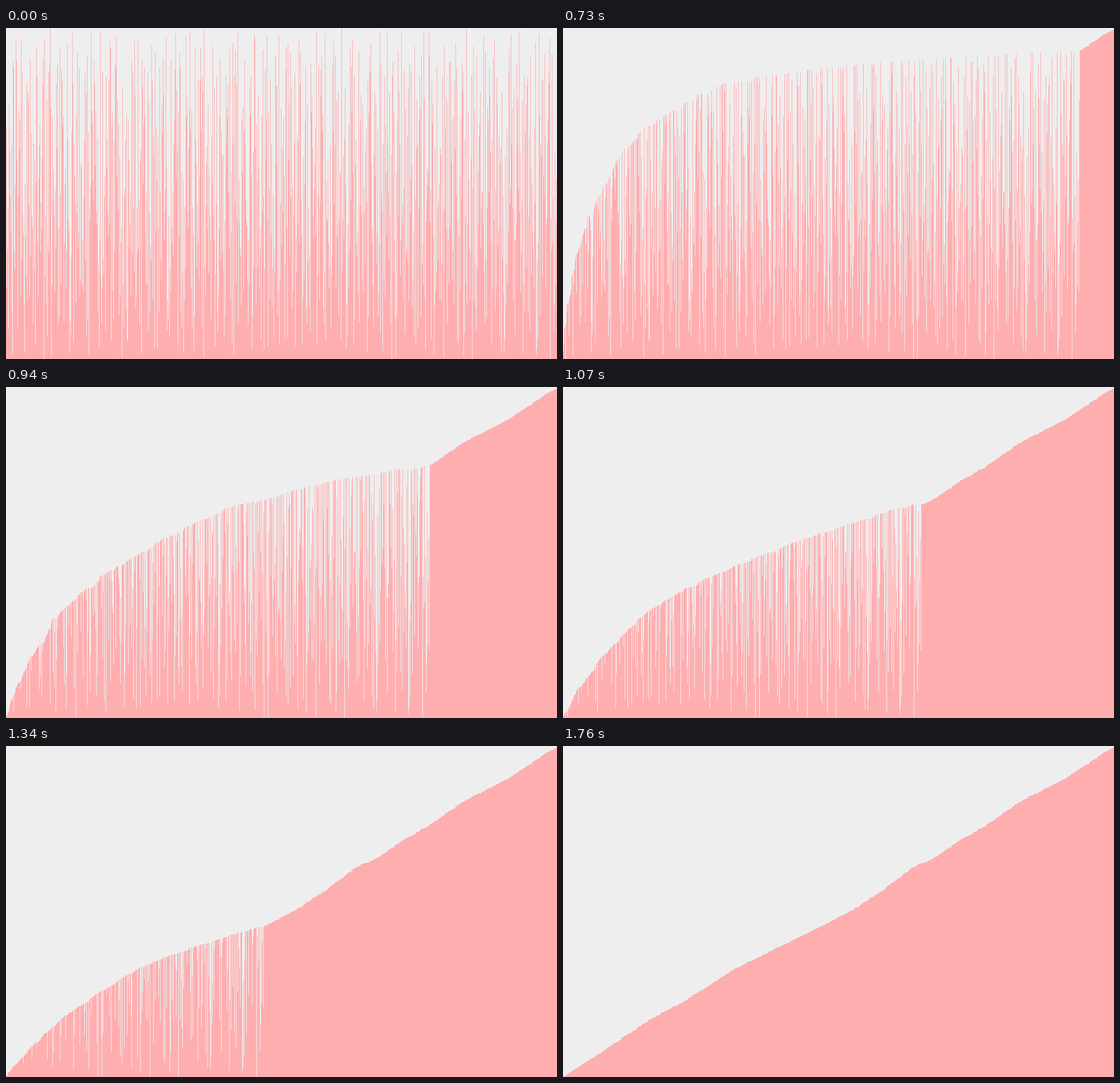
An HTML page with a canvas that plays this animation: 966 px wide and 580 px high, repeating every 2.07 s.

```html
<!DOCTYPE html>
<html lang="en">
<head>
<meta charset="utf-8">
<title>Bubble sort</title>
<style>
  html, body { margin: 0; width: 100%; height: 100%; overflow: hidden; background: #eee; }
  canvas { display: block; }
</style>
</head>
<body>
<canvas id="stage" width="966" height="580"></canvas>
<script>
const W = 966, H = 580, LOOP = 2070;
const BLOCKS = 51, BLOCK_SIZE = 19, COUNT = BLOCKS * BLOCK_SIZE;
const LEFT = -1; // one bar sits off the left edge, two off the right
const STEPS = 17;
const ctx = document.getElementById('stage').getContext('2d');

// Key points of the sorted outline: x, top
const outline = [
  [-1, 580], [60, 541], [148, 482], [222, 441], [296, 393], [430, 327],
  [508, 287], [560, 253], [615, 211], [650, 197], [692, 167], [745, 137],
  [800, 98], [880, 57], [925, 27], [967, 0]
];

// Step and finished passes; the rate is even between these points
const progress = [[0, 15], [2, 109], [8, 454], [12, 696], [15, 906], [16, 968]];

function interpolate(points, x) {
  let i = 1;
  while (i < points.length - 1 && points[i][0] < x) i++;
  const [x0, y0] = points[i - 1], [x1, y1] = points[i];
  return y0 + (y1 - y0) * (x - x0) / (x1 - x0);
}

function randomizer(seed) {
  return () => {
    seed = (seed * 1664525 + 1013904223) >>> 0;
    return seed / 4294967296;
  };
}

const random = randomizer(2024);

function shuffle(list) {
  for (let i = list.length - 1; i > 0; i--) {
    const j = Math.floor(random() * (i + 1));
    [list[i], list[j]] = [list[j], list[i]];
  }
  return list;
}

// Slightly uneven steps along the outline, shortest bar first
function makeTops() {
  const tops = Array.from({ length: COUNT }, (_, i) => {
    const top = interpolate(outline, i + LEFT) + (random() - 0.5) * 5;
    return Math.round(Math.min(H, Math.max(0, top)));
  });
  return tops.sort((a, b) => b - a);
}

// Every block of neighbours gets one bar from each height range
function makeBars() {
  const tops = makeTops();
  const ranges = Array.from({ length: BLOCK_SIZE }, (_, i) =>
    shuffle(tops.slice(i * BLOCKS, (i + 1) * BLOCKS)));
  return Array.from({ length: BLOCKS }, (_, i) =>
    shuffle(ranges.map(range => range[i]))).flat();
}

function bubblePass(bars, done) {
  for (let i = 0; i < COUNT - 1 - done; i++) {
    if (bars[i] < bars[i + 1]) {
      [bars[i], bars[i + 1]] = [bars[i + 1], bars[i]];
    }
  }
}

function makeStates() {
  const bars = makeBars();
  const states = [bars.slice()];
  let done = 0;
  for (let step = 0; step < STEPS; step++) {
    const goal = Math.round(interpolate(progress, step));
    while (done < goal) bubblePass(bars, done++);
    states.push(bars.slice());
  }
  return states;
}

// Steps of 70 ms, with every fifth one or so 10 ms shorter
const stepTime = i => 660 + 70 * i - 10 * Math.floor(Math.max(0, i - 1) / 5);
const states = makeStates();
let shown = -1;

function draw(bars) {
  ctx.fillStyle = '#eeeeee';
  ctx.fillRect(0, 0, W, H);
  ctx.fillStyle = '#ffaeb0';
  bars.forEach((top, i) => ctx.fillRect(i + LEFT, top, 1, H - top));
}

function tick() {
  const t = performance.now() % LOOP;
  let state = 0;
  while (state < STEPS && t >= Math.min(1760, stepTime(state))) state++;
  if (state !== shown) draw(states[shown = state]);
  requestAnimationFrame(tick);
}
tick();
</script>
</body>
</html>
```
